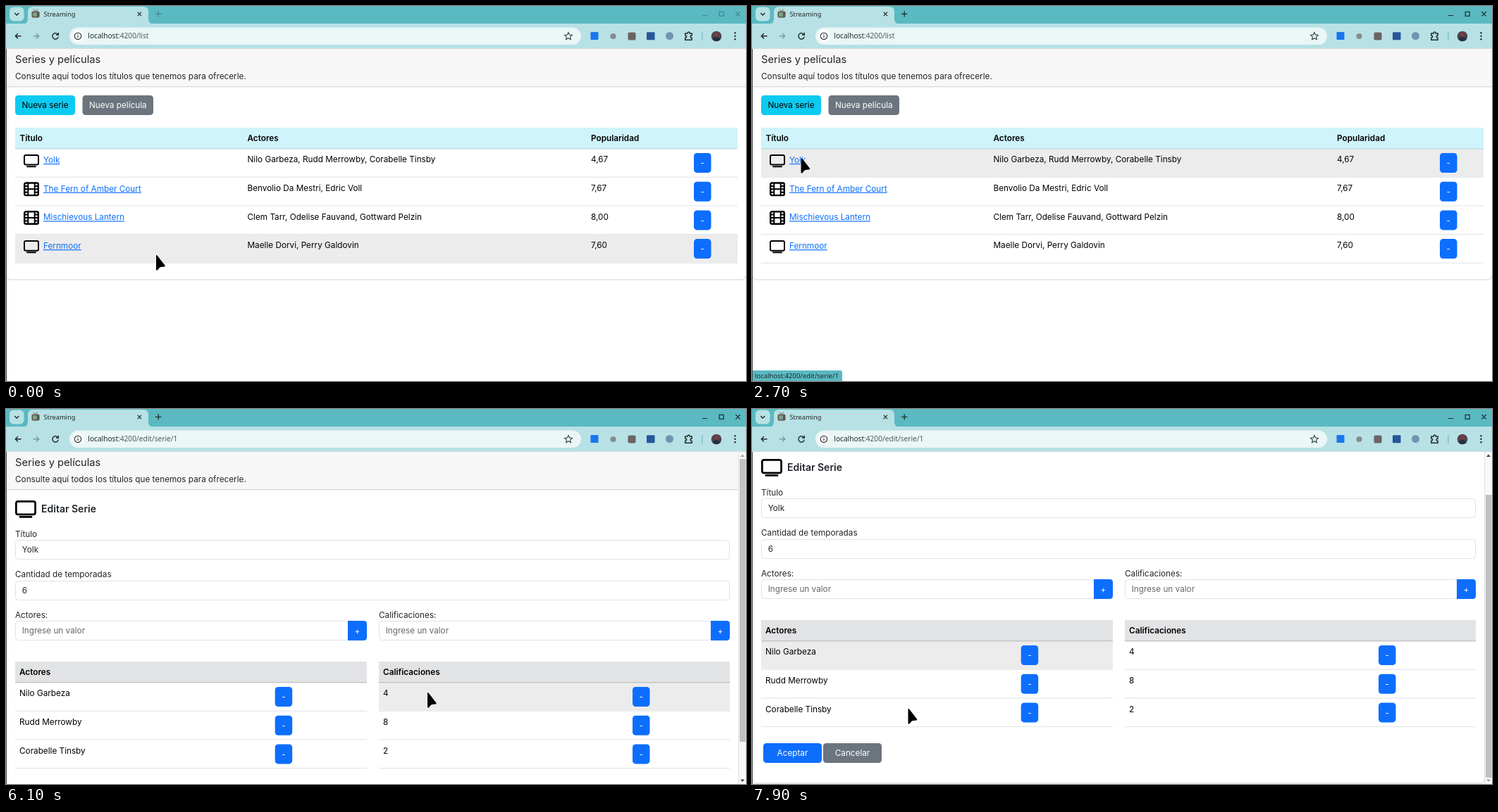
Write an HTML page that moves like this. It is 1050 px wide and 533 px high and loops after 8000 ms.

```html
<!DOCTYPE html>
<html lang="es">
<head>
<meta charset="utf-8">
<style>
  html, body { margin: 0; height: 100%; overflow: hidden; background: #fff; }
  svg { display: block; width: 100vw; height: 100vh; }
  text { font: 11.75px Inter, sans-serif; fill: #212529; white-space: pre; }
  text.b { font-weight: 600; fill: #000; }
  text.h { font-size: 14.7px; }
  text.title { font-size: 14px; font-weight: 600; }
  text.link { fill: #0d6efd; text-decoration: underline; }
  text.w { fill: #fff; }
  text.k { fill: #000; }
  text.ph { fill: #63676a; }
  text.mid { text-anchor: middle; }
  text.ui { font: 10.15px "Noto Sans", sans-serif; fill: #1f2a2b; }
  text.tab { font-size: 9.25px; }
  text.status { font-size: 9.5px; }
  .port { fill: #4d5c5e; }
</style>
</head>
<body>
<svg id="stage" viewBox="0 0 1050 533" preserveAspectRatio="none"></svg>
<script>
const TEAL = '#5ab9c1', PALE = '#b7e1e5', BLUE = '#0d6efd', GREY = '#6c757d', LINE = '#dee2e6';
const PITCH = 40.7;

const rect = (x, y, w, h, fill, r = 0, more = '') =>
  `<rect x="${x}" y="${y}" width="${w}" height="${h}" rx="${r}" fill="${fill}" ${more}/>`;
const text = (x, y, s, cls = '') => `<text x="${x}" y="${y}" class="${cls}">${s}</text>`;
const path = (d, stroke = '#1f2a2b', w = 1.4, fill = 'none', more = '') =>
  `<path d="${d}" stroke="${stroke}" stroke-width="${w}" fill="${fill}" ${more}/>`;
const circle = (x, y, r, fill, more = '') => `<circle cx="${x}" cy="${y}" r="${r}" fill="${fill}" ${more}/>`;
const at = (x, y, s, body) => `<g transform="translate(${x} ${y}) scale(${s})">${body}</g>`;

const button = (x, y, w, label, fill = BLUE, cls = 'w') =>
  rect(x, y, w, 28, fill, 4.4) + text(x + w / 2, y + 18.3, label, cls + ' mid');
const input = (x, y, w, value, cls = '') =>
  rect(x + .5, y + .5, w - 1, 27, '#fff', 4, `stroke="${LINE}"`) + text(x + 9.7, y + 18.2, value, cls);
const tv = (x, y, s) => at(x, y, s,
  rect(1, 1, 20, 13.6, 'none', 2, 'stroke="#000" stroke-width="2"') +
  path('M5 17.2H17', '#000', 1.9, 'none', 'stroke-linecap="round"'));
const film = (x, y) => at(x, y, 1,
  rect(1.2, 1.2, 19.6, 17.6, 'none', 2, 'stroke="#000" stroke-width="2.4"') +
  path('M6.3 1V19M15.7 1V19M1 10H21M1 5.6H6M1 14.4H6M16 5.6H21M16 14.4H21', '#000', 2));

const header = w =>
  rect(1, 61, w, 54, '#f7f7f7') + rect(1, 114.3, w, 1, '#d0d0d0') +
  text(13, 81, 'Series y películas', 'h') +
  text(13, 104.2, 'Consulte aquí todos los títulos que tenemos para ofrecerle.');
const cardEdge = (y, w) => path(`M1 ${y - 6}Q1 ${y} 6 ${y}H${w - 5}Q${w} ${y} ${w} ${y - 6}`, '#d2d2d2', 1);

const titles = [
  [tv, 'Yolk', 'Nilo Garbeza, Rudd Merrowby, Corabelle Tinsby', '4,67'],
  [film, 'The Fern of Amber Court', 'Benvolio Da Mestri, Edric Voll', '7,67'],
  [film, 'Mischievous Lantern', 'Clem Tarr, Odelise Fauvand, Gottward Pelzin', '8,00'],
  [tv, 'Fernmoor', 'Maelle Dorvi, Perry Galdovin', '7,60'],
];

const listPage = header(1049) +
  button(13, 127, 85, 'Nueva serie', '#0dcaf0', 'k') +
  button(108.5, 127, 100.5, 'Nueva película', GREY) +
  rect(13, 173, 1025, 30, '#cff4fc') + rect(13, 202.4, 1025, 1, '#b4cfd6') +
  text(19.5, 192, 'Título', 'b') + text(342.5, 192, 'Actores', 'b') + text(830, 192, 'Popularidad', 'b') +
  titles.map(([icon, name, cast, score], i) => {
    const y = 203 + i * PITCH;
    return icon(25, y + (icon === tv ? 8 : 6.6), 1) + text(53, y + 20, name, 'link') +
      text(342.5, y + 19.3, cast, 'k') + text(830, y + 19.3, score, 'k') +
      button(976, y + 6, 24.5, '-') + rect(13, y + PITCH - 1, 1025, 1, LINE);
  }).join('') + cardEdge(389, 1049.5);

const editTable = (x, w, name, values, buttonX) =>
  text(x, 297, name + ':') + input(x, 301, w - 26, 'Ingrese un valor', 'ph') +
  path(`M${x + w - 27} 301h22.6q4.4 0 4.4 4.4v19.2q0 4.4-4.4 4.4h-22.6z`, 'none', 0, BLUE) +
  text(x + w - 13.5, 319.5, '+', 'w mid') +
  rect(x, 359, w, 30, '#e2e3e5') + rect(x, 388.3, w, 1, '#b5b6b7') + text(x + 6, 378, name, 'b') +
  values.map((v, i) => {
    const y = 389 + i * PITCH;
    return text(x + 6, y + 19.3, v, 'k') + button(buttonX, y + 6, 24.5, '-') + rect(x, y + PITCH - 1, w, 1, LINE);
  }).join('');

const editPage = header(1038) + tv(13, 130, 1.36) + text(50, 146.6, 'Editar Serie', 'title') +
  text(13, 181.5, 'Título') + input(13, 186, 1014, 'Yolk') +
  text(13, 239.2, 'Cantidad de temporadas') + input(13, 244, 1014, '6') +
  editTable(13, 499, 'Actores', titles[0][2].split(', '), 381.7) +
  editTable(529, 498, 'Calificaciones', [4, 8, 2], 889) +
  button(16, 534, 83, 'Aceptar') + button(101, 534, 83, 'Cancelar', GREY) + cardEdge(591, 1039);

const scrollbar = rect(1039, 60, 11, 473, '#f8f8f8') + rect(1039, 60, 1, 473, '#e0e0e0') +
  rect(1041, 71, 8.5, 402, '#c1c1c1', 0, 'id="thumb"') +
  '<path id="up" d="M1042 68h6l-3-3.5z"/><path id="down" d="M1042 526.5h6l-3 3.5z"/>';

const chrome = rect(0, 0, 1050, 26, TEAL) + rect(0, 25, 1050, 35, PALE) + rect(0, 60, 1050, 1, '#d5dcdd') +
  rect(0, 61, 1, 472, '#4a4f4f') +
  path('M24 25.5Q31 25.5 31 18V8Q31 1 38 1H195Q202 1 202 8V18Q202 25.5 209 25.5Z', 'none', 0, PALE) +
  rect(5, 1.5, 20.5, 20, PALE, 6) + path('M12.3 10l3 3 3-3') +
  rect(36.5, 7.5, 11, 9, '#5d5546', 2) + rect(38, 9, 6, 6, '#79a08b', 1) + path('M39 4.5l3 3 3-3', '#5d5546', 1) +
  text(53.5, 14.9, 'Streaming', 'ui tab') + path('M186.7 8.7l5.4 5.4m0-5.4l-5.4 5.4', '#1f2a2b', 1.2) +
  `<g id="controls" fill="none" stroke-width="1.2">
    <path d="M212 11.3h8.4M216.2 7v8.4M988 13.5h7M1035.3 8l6.4 6.4m0-6.4l-6.4 6.4"/>
    <rect x="1012.2" y="8.3" width="6" height="6"/></g>` +
  path('M21.5 42.7H13.5M17 39l-3.7 3.7 3.7 3.7') +
  path('M38.7 42.7h8M43 39l3.7 3.7-3.7 3.7', '#7a9a9e') +
  path('M73.7 40.5A4.2 4.2 0 1 0 74.3 43.5M74.3 37.8V41H71', '#1f2a2b', 1.4) +
  rect(90, 30.5, 726, 24.5, '#ebf6f7', 12.2) + circle(102, 42.7, 8.5, '#fff') +
  circle(102, 42.7, 4.7, 'none', 'stroke="#1f2a2b" stroke-width="1.1"') + path('M102 42v3M102 39.8v1.1', '#1f2a2b', 1.1) +
  '<text x="116.3" y="46.3" class="ui">localhost<tspan class="port" id="url"></tspan></text>' +
  path('M798 37.4l1.6 3.5 3.8.4-2.8 2.6.8 3.8-3.4-2-3.4 2 .8-3.8-2.8-2.6 3.8-.4z', '#344244', 1.1) +
  rect(829.5, 37, 11, 11, '#1976ee', 1) + circle(861.5, 43, 4, '#858b8d') +
  rect(882.5, 37.5, 11, 11, '#6b6463', 2) + rect(909, 37.3, 11.5, 11, '#26569b', 1) + circle(941.5, 42.5, 5.5, '#7193b1') +
  path('M963.7 39h3.3q0-2 1.6-2t1.6 2h3v3q-2 0-2 1.7t2 1.7v2.8h-9.5v-3q2 0 2-1.6t-2-1.6z', '#1f2a2b', 1.4) +
  rect(987.3, 37, 1.2, 12, '#6fbac1') +
  circle(1008, 43, 7.3, '#4b4450') + circle(1008, 40.5, 3, '#833b36') + path('M1002.7 48q1-4 5.3-4t5.3 4q-5.3 4.3-10.6 0z', 'none', 0, '#262f42') +
  [38.3, 42.8, 47.3].map(y => circle(1034.5, y, 1.2, '#1f2a2b')).join('');

const status = `<g id="status">${path('M1 518H125q3 0 3 3v12H1z', 'none', 0, TEAL)}${
  text(4, 529.3, 'localhost:4200/edit/serie/1', 'ui status')}</g>`;

const outline = 'stroke-linejoin="round" paint-order="stroke"';
const cursor = '<g id="cursor">' +
  `<g id="arrow">${path('M0 .5V20.5Q.3 22.6 2 21.2L5.3 17.6Q6 17 7 16.9L11.8 16.6Q13.6 16.3 12.4 14.6L1.4.3Q.4-.5 0 .5Z', '#fff', 1.4, '#000', outline)}</g>` +
  `<g id="hand">${path('M-2.5 5.5Q-1-.3 1 5.5V10L7 11.2Q9 11.8 8.7 14L7.6 20.5Q7.2 22 5.6 22H1Q-.3 22-1.2 20.7L-5 15.3Q-5.6 13.3-3.7 13.2L-2 14.5Z', '#fff', 1.4, '#000', outline)}</g></g>`;

const $ = id => document.getElementById(id);
$('stage').innerHTML = rect(0, 0, 1050, 533, '#fff') +
  `<g id="page">${rect(0, 0, 0, PITCH - 1, '#ececec', 0, 'id="hover"')}` +
  `<g id="list">${listPage}</g><g id="edit">${editPage}</g></g>` +
  `<g id="bar">${scrollbar}</g>` + chrome + status + cursor;

// Pointer track: time, x, y
const track = [
  [500, 213, 354], [600, 206, 368], [1300, 69.5, 216], [3000, 69.5, 216], [3400, 306, 219],
  [4200, 306, 219], [4500, 170, 295], [4900, 3.5, 265], [5100, 7, 230], [5700, 400, 392],
  [6000, 528, 404], [6100, 598, 403], [6200, 500, 392], [6800, 183, 158], [6900, 150, 89],
  [7100, 140, 38], [7700, 221.5, 426],
];
function pointer(t) {
  const i = track.findIndex(k => k[0] > t);
  if (i === 0) return track[0].slice(1);
  if (i < 0) return track.at(-1).slice(1);
  const [t0, x0, y0] = track[i - 1], [t1, x1, y1] = track[i], u = (t - t0) / (t1 - t0);
  return [x0 + (x1 - x0) * u, y0 + (y1 - y0) * u];
}

const set = (id, attrs) => { for (const k in attrs) $(id).setAttribute(k, attrs[k]); };
const show = (id, on) => set(id, { visibility: on ? 'visible' : 'hidden' });

function draw(now) {
  const t = Math.floor(now % 8000 / 100) * 100;
  const editing = t >= 2800, scrolled = t >= 7900, linked = t >= 1300 && t < 2600;
  const [x, y] = pointer(t);

  show('list', !editing);
  show('edit', editing);
  show('bar', editing);
  show('arrow', !linked);
  show('hand', linked);
  $('url').textContent = editing ? ':4200/edit/serie/1' : ':4200/list';
  set('controls', { stroke: t < 2600 ? '#43868d' : '#1f2a2b' });
  set('status', { opacity: t < 1500 || t >= 3200 ? 0 : t < 1600 ? .5 : 1 });
  set('page', { transform: `translate(0 ${scrolled ? -59 : 0})` });
  set('thumb', { y: scrolled ? 122 : 71 });
  set('up', { fill: scrolled ? '#444' : '#a0a0a0' });
  set('down', { fill: scrolled ? '#a0a0a0' : '#444' });
  set('cursor', { transform: `translate(${x} ${y})` });

  const top = editing ? 389 : 203, row = Math.floor((y - top) / PITCH);
  const [left, right] = !editing ? [13, 1038] : x < 520 ? [13, 512] : [529, 1027];
  const inside = row >= 0 && row < (editing ? 3 : 4) && x >= left && x < right;
  set('hover', { x: left, y: top + row * PITCH, width: inside ? right - left : 0 });
  requestAnimationFrame(draw);
}
requestAnimationFrame(draw);
</script>
</body>
</html>
```
